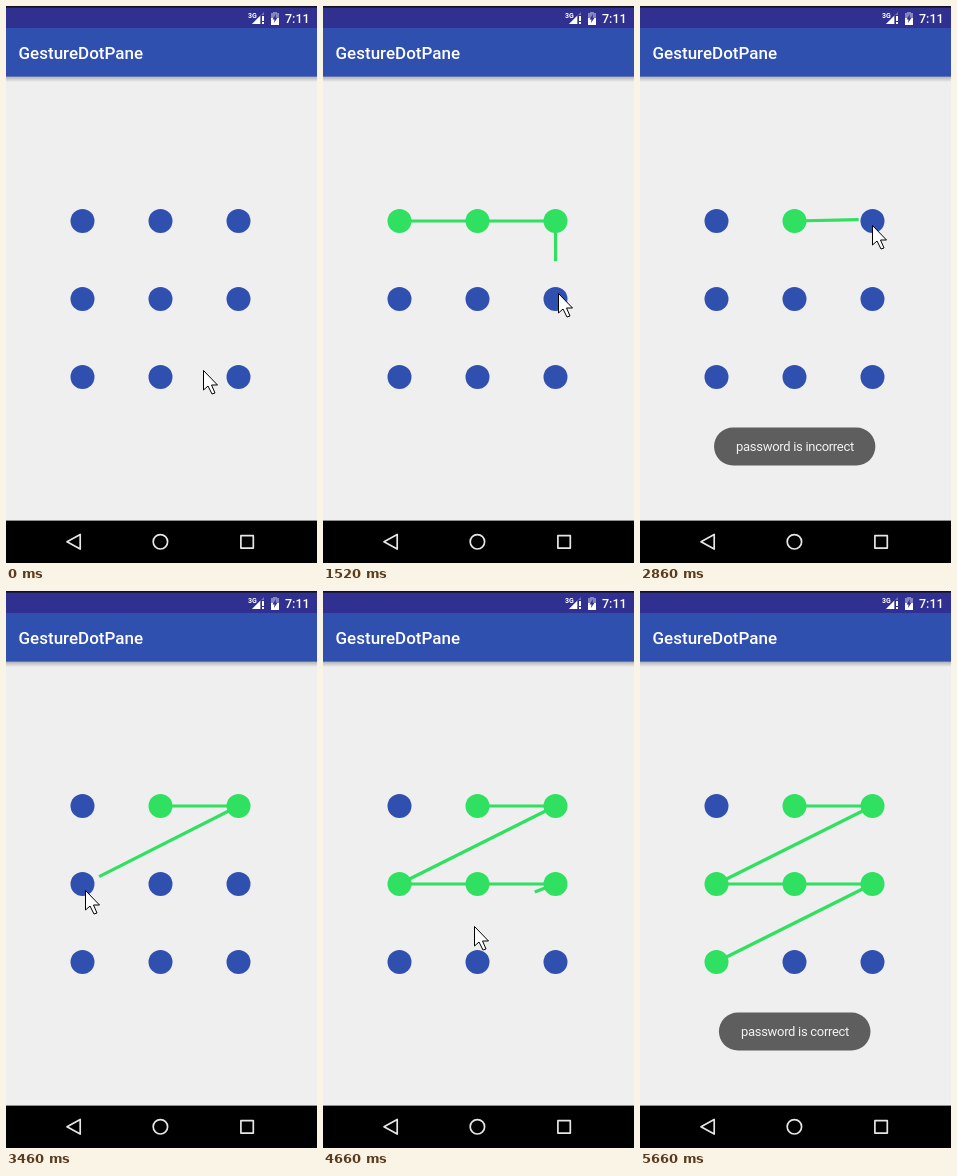
These frames come from a looping animation (311x557 px, 5860 ms). An HTML page with a canvas:

```html
<!DOCTYPE html>
<html lang="en">
<head>
<meta charset="utf-8">
<title>Pattern lock</title>
<style>
  html, body { margin: 0; width: 100%; height: 100%; overflow: hidden; background: #efefef; }
  canvas { display: block; }
</style>
</head>
<body>
<canvas id="stage" width="311" height="557"></canvas>
<script>
const ctx = document.getElementById('stage').getContext('2d');
const LOOP = 5860, LAG = 100, RADIUS = 12;
const BLUE = '#3050b0', GREEN = '#30e060', PINK = '#f54080';
const FONT = 'Roboto, sans-serif';

// Stops of the pointer: time, x, y; it eases from one to the next
const stops = [
  [0, 197, 364], [500, 76, 217], [1140, 234, 219], [1960, 236, 372], [2240, 141, 208],
  [2340, 154, 217], [2900, 233, 219], [2960, 234, 219], [3460, 79, 299], [3560, 78, 298],
  [4300, 228, 297], [4500, 229, 299], [4780, 100, 359], [5160, 76, 374], [5360, 28, 379]
];

// Dots are numbered by rows; each joins when the finger reaches it
const strokes = [
  { dots: [0, 1, 2, 5, 8], press: 560, release: 2100, clear: 2440, done: PINK },
  { dots: [1, 2, 3, 4, 5, 6], press: 2500, release: 5200, clear: LOOP, done: GREEN }
];

const clamp = v => Math.max(0, Math.min(1, v));
const ease = k => k * k * (3 - 2 * k);
const center = i => [76.5 + 78 * (i % 3), 215 + 78 * Math.floor(i / 3)];

function pointer(t) {
  const next = stops.findIndex(s => s[0] > t);
  const [t1, x1, y1] = stops.at(next < 0 ? -1 : next);
  const [t0, x0, y0] = stops.at(next < 0 ? -2 : next - 1);
  const k = ease(clamp((t - t0) / (t1 - t0)));
  return [x0 + (x1 - x0) * k, y0 + (y1 - y0) * k];
}

// The touch trails the pointer
function finger(t) {
  const [x, y] = pointer(t - LAG);
  return [x - 2, y - 5];
}

function joinedDots({ dots, press, release }, t) {
  let n = 0;
  for (let s = press; s <= Math.min(t, release) && n < dots.length; s += 20) {
    const [x, y] = finger(s), [cx, cy] = center(dots[n]);
    if (Math.hypot(x - cx, y - cy) < RADIUS) n++;
  }
  return dots.slice(0, n);
}

// The picture advances in 100 ms steps with three short 20 ms ones
function step(t) {
  const shift = 20 * [620, 2140, 2760].filter(s => t >= s).length;
  return Math.floor((t - shift) / 100) * 100 + shift;
}

function rect(color, x, y, w, h) {
  ctx.fillStyle = color;
  ctx.fillRect(x, y, w, h);
}

function trace(points, close) {
  ctx.beginPath();
  points.forEach(p => ctx.lineTo(...p));
  if (close) ctx.closePath();
}

function shape(color, points) {
  ctx.fillStyle = color;
  trace(points, true);
  ctx.fill();
}

function disc(x, y, r) {
  ctx.beginPath();
  ctx.arc(x, y, r, 0, 7);
}

function label(text, x, y, font, color, spacing = 0) {
  ctx.font = `${font} ${FONT}`;
  ctx.letterSpacing = spacing + 'px';
  ctx.fillStyle = color;
  ctx.fillText(text, x, y);
}

function drawChrome() {
  rect('#efefef', 0, 0, 311, 557);
  const shade = ctx.createLinearGradient(0, 70.5, 0, 76);
  shade.addColorStop(0, '#b0b0b0');
  shade.addColorStop(1, '#efefef');
  rect(shade, 0, 70, 311, 6);
  rect(BLUE, 0, 22, 311, 48.6);
  rect('#303090', 0, 0, 311, 22);
  rect('#101020', 0, 0, 311, 1.6);
  label('GestureDotPane', 12.5, 53, '500 17px', '#fff');
  drawStatus();
  drawNav();
}

function drawStatus() {
  label('3G', 242, 11.5, '700 7px', '#fff');
  label('7:11', 279, 17, '500 12.5px', '#fff');
  shape('#7476b4', [[258, 6], [258, 18], [246, 18]]);
  shape('#fff', [[254, 10], [254, 18], [246, 18]]);
  rect('#303090', 255, 9, 4, 9);
  rect('#fff', 256, 10, 2, 5);
  rect('#fff', 256, 16, 2, 2);
  rect('#8385bd', 267, 6, 4, 1);
  rect('#8385bd', 265, 7, 8, 5);
  rect('#fff', 265, 12, 8, 7);
  shape('#303090', [[270, 8], [266.5, 13.5], [268.5, 13.5], [268, 17], [271.5, 11.8], [269.6, 11.8]]);
}

function drawNav() {
  rect('#000', 0, 514.6, 311, 43);
  ctx.strokeStyle = '#e6e6e6';
  ctx.lineWidth = 1.7;
  ctx.lineJoin = 'round';
  trace([[61, 535.8], [74.2, 528.5], [74.2, 543.1]], true);
  ctx.stroke();
  disc(154.4, 535.8, 7.2);
  ctx.stroke();
  ctx.strokeRect(234.9, 529.7, 12.4, 12.4);
}

function drawPattern(t) {
  const colors = Array(9).fill(BLUE);
  for (const s of strokes) {
    const dots = t < s.clear ? joinedDots(s, t) : [];
    if (!dots.length) continue;
    const held = t < s.release;
    const color = held ? GREEN : s.done;
    dots.forEach(i => colors[i] = color);
    ctx.strokeStyle = color;
    ctx.lineWidth = 3.2;
    trace([...dots.map(center), ...(held ? [finger(t)] : [])]);
    ctx.stroke();
  }
  colors.forEach((color, i) => {
    ctx.fillStyle = color;
    disc(...center(i), RADIUS);
    ctx.fill();
  });
}

function drawToast(text, alpha) {
  if (alpha <= 0) return;
  ctx.save();
  ctx.globalAlpha = alpha;
  ctx.textAlign = 'center';
  ctx.font = `13px ${FONT}`;
  ctx.letterSpacing = '-0.3px';
  const w = ctx.measureText(text).width + 43.5;
  ctx.fillStyle = '#5e5e5e';
  ctx.beginPath();
  ctx.roundRect(154.7 - w / 2, 421.5, w, 38, 19);
  ctx.fill();
  label(text, 155, 445, '13px', '#f2f2f2', -0.3);
  ctx.restore();
}

function drawPointer(t) {
  if (t >= 5460) return;
  const [x, y] = pointer(t).map(Math.round);
  ctx.save();
  ctx.translate(x + 0.5, y + 0.5);
  ctx.lineJoin = 'miter';
  ctx.strokeStyle = '#000';
  ctx.lineWidth = 1;
  shape('#fff', [[0, 0], [0, 19.5], [4.5, 15.5], [8.5, 23.5], [11.5, 22.5], [8, 14.5], [14, 14.5]]);
  ctx.stroke();
  ctx.restore();
}

function draw(now) {
  const t = step(now % LOOP);
  drawChrome();
  drawPattern(t);
  drawToast('password is incorrect', Math.min(clamp((t - 2073) / 190), clamp((3050 - t) / 180)));
  drawToast('password is correct', clamp((t - 5460) / 190));
  drawPointer(t);
}

const start = performance.now();
(function tick() {
  draw(performance.now() - start);
  requestAnimationFrame(tick);
})();
</script>
</body>
</html>
```
